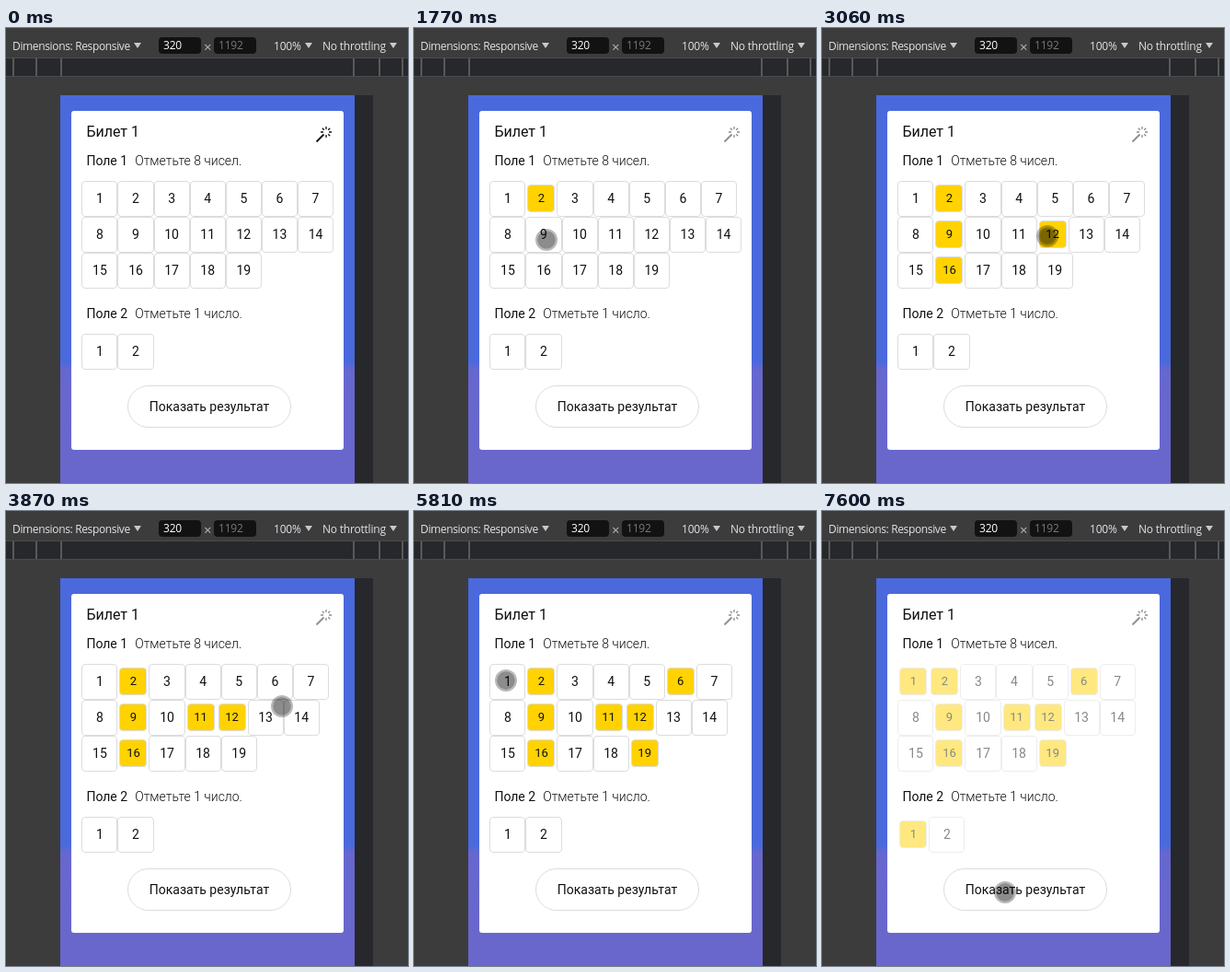
These frames come from a looping animation (437 px wide and 494 px high, 8 s). An HTML page:

```html
<!DOCTYPE html>
<html lang="ru">
<head>
<meta charset="utf-8">
<title>Билет</title>
<style>
html, body { margin: 0; width: 100%; height: 100%; overflow: hidden; background: #3c3c3c; }
.stage { position: relative; width: 437px; height: 494px; overflow: hidden; background: #3c3c3c; font: 14px/20px Roboto, sans-serif; color: #111; }
.stage > *, .card > * { position: absolute; box-sizing: border-box; white-space: nowrap; }
.bar { font: 12px/18px "Open Sans", "Noto Sans", sans-serif; letter-spacing: -.2px; color: #e2e3e6; top: 11px; }
.bar.arrow::after { content: ""; display: inline-block; margin-left: 4px; border: 4px solid transparent; border-top: 6px solid #c8c9cc; border-bottom: 0; vertical-align: 2px; }
.bar.input { top: 10px; width: 46px; height: 18px; padding-left: 5px; border-radius: 4px; background: #121212; color: #fff; }
.ruler { left: 0; top: 32px; width: 437px; height: 21px; background: #27282b; border: solid #4a4b4d; border-width: 1px 0; }
.ruler i { position: absolute; top: 0; width: 2px; height: 19px; background: #58595b; }
.shade { left: 379px; top: 73px; width: 20px; height: 421px; background: #27282b; }
.page { left: 59px; top: 73px; width: 320px; height: 421px; background: linear-gradient(#4a69dc 289px, #6667cf 299px, #6a67cb); }
.card { left: 71px; top: 90px; width: 296px; height: 368px; background: #fff; border-radius: 3px; }
.title { left: 16.4px; top: 13px; font-size: 16px; }
.label { left: 16.4px; }
.hint { left: 69.2px; font-weight: 300; }
.field { left: 11.4px; }
.row { display: flex; height: 39px; }
.cell { box-sizing: border-box; flex: none; width: 39.1px; height: 39px; line-height: 37px; border: 1px solid #dcdcdc; border-radius: 4px; text-align: center; }
.button { left: 61px; top: 298px; width: 178px; height: 46px; line-height: 44px; border: 1px solid #dcdcdc; border-radius: 23px; text-align: center; }
.wand { left: 264px; top: 15px; width: 22px; height: 22px; fill: none; stroke: #111; stroke-width: 1.3; }
.dot { left: -12px; top: -12px; width: 24px; height: 24px; border-radius: 50%; background: radial-gradient(circle, rgba(0,0,0,.45) 9.3px, rgba(0,0,0,.28) 10px); }
.dot::after { content: ""; position: absolute; inset: 4px; border-radius: 50%; background: rgba(0,0,0,.12); opacity: 0; }
</style>
</head>
<body>
<div class="stage">
  <div class="bar arrow" style="left:7px;letter-spacing:-.36px">Dimensions: Responsive</div>
  <div class="bar input" style="left:166px">320</div>
  <div class="bar" style="left:215px;font-size:15px;color:#b4b5b8">×</div>
  <div class="bar input" style="left:226px;color:#77787a">1192</div>
  <div class="bar arrow" style="left:291px">100%</div>
  <div class="bar arrow" style="left:344px">No throttling</div>
  <div class="ruler">
    <i style="left:7px"></i><i style="left:32px"></i><i style="left:59px"></i>
    <i style="left:377px"></i><i style="left:405px"></i><i style="left:430px"></i>
  </div>
  <div class="shade"></div>
  <div class="page"></div>
  <div class="card">
    <div class="title">Билет 1</div>
    <svg class="wand" viewBox="0 0 22 22">
      <path d="M2.5 18.5 10.5 10.5" stroke-width="1.8"/>
      <path d="M13 2v3M13 11v3M7 8h3M16 8h3M8.8 3.8l2 2M17.2 3.8l-2 2M17.2 12.2l-2-2"/>
    </svg>
    <div class="label" style="top:44px">Поле 1</div>
    <div class="hint" style="top:44px">Отметьте 8 чисел.</div>
    <div class="field" id="a" style="top:76px"></div>
    <div class="label" style="top:210px">Поле 2</div>
    <div class="hint" style="top:210px">Отметьте 1 число.</div>
    <div class="field" id="b" style="top:242px"></div>
    <div class="button">Показать результат</div>
  </div>
  <div class="dot"></div>
</div>
<script>
const LOOP = 8000, TICK = 135;

// Pointer key points: time, x, y and the cell tapped there
const points = [
  [560, 94, 171], [1070, 152, 190],
  [1380, 152, 190, 'a2'], [1770, 144, 230],
  [2050, 144, 230, 'a9'], [2400, 142, 266, 'a16'], [2750, 245, 226],
  [3060, 245, 226, 'a12'], [3470, 198, 229, 'a11'], [3870, 300, 212], [4170, 302, 189],
  [4450, 302, 189, 'a6'], [4990, 260, 258],
  [5130, 260, 258, 'a19'], [5410, 79, 307], [5810, 100, 184],
  [5950, 100, 184, 'a1'], [6230, 102, 333], [6510, 107, 353],
  [6940, 107, 353, 'b1'], [7335, 220, 435], [7600, 199, 414]
];

function buildField(name, count) {
  const field = document.getElementById(name);
  let row;
  for (let n = 1; n <= count; n++) {
    if (n % 7 === 1) {
      row = field.appendChild(document.createElement('div'));
      row.className = 'row';
    }
    const cell = row.appendChild(document.createElement('div'));
    cell.className = 'cell';
    cell.id = name + n;
    cell.textContent = n;
  }
}

const rules = [];
const pct = t => (t / LOOP * 100).toFixed(3) + '%';
const animate = (selector, name, frames) => rules.push(
  `@keyframes ${name} { ${frames} }`,
  `${selector} { animation: ${name} ${LOOP}ms step-end infinite; }`);
const switchAt = (selector, name, time, style) =>
  animate(selector, name, `${pct(time)}, to { ${style} }`);

buildField('a', 19);
buildField('b', 2);

const taps = points.filter(p => p[3]);
const tapTime = id => taps.find(p => p[3] === id)[0];
const picked = 'width: 30px; height: 30px; margin: 4px 2px 5px; line-height: 28px; font-size: 13px; background: #ffd200;';
for (const [time, , , id] of taps) switchAt('#' + id, 'pick-' + id, time, picked);
switchAt('.wand', 'dim', tapTime('a2'), 'stroke: #8c8c8c;');
switchAt('#a .row', 'fade-a', tapTime('a1'), 'opacity: .5;');
switchAt('#b .row', 'fade-b', tapTime('b1'), 'opacity: .5;');

// The pointer moves evenly between key points, one jump per tick
const path = points.map(([t, x, y], i) => {
  const next = points[i + 1];
  const timing = next ? `steps(${Math.round((next[0] - t) / TICK)})` : 'step-end';
  return `${pct(t)}${next ? '' : ', to'} { opacity: 1; transform: translate(${x}px, ${y}px); animation-timing-function: ${timing}; }`;
});
animate('.dot', 'travel', '0% { opacity: 0; } ' + path.join(' '));
animate('.dot::after', 'press', taps.map(([t]) =>
  `${pct(t)} { opacity: 1; } ${pct(t + TICK)} { opacity: 0; }`).join(' '));

document.head.appendChild(document.createElement('style')).textContent = rules.join('\n');
</script>
</body>
</html>
```
